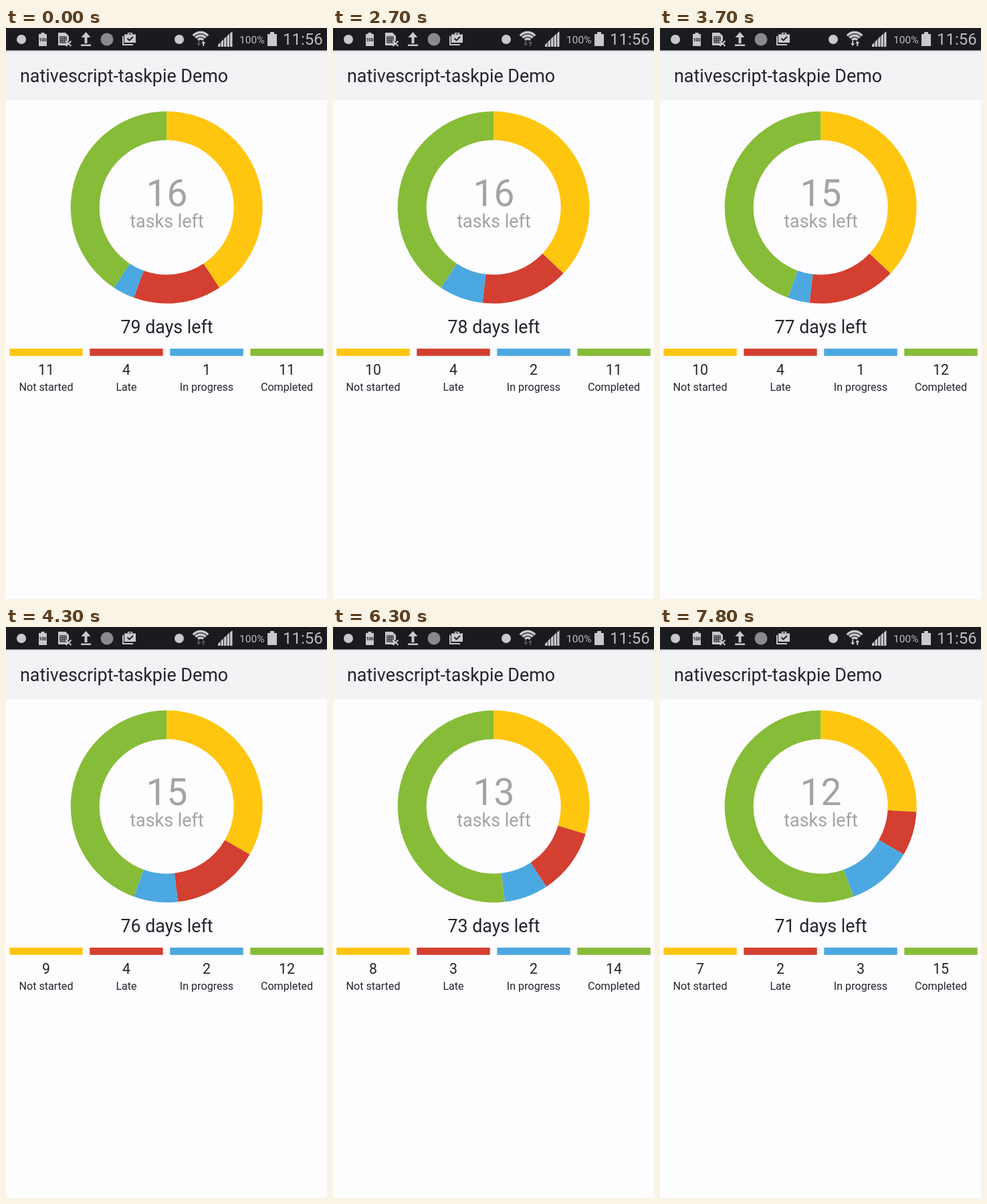
Recreate the animation shown at these times as an HTML page. Size 480x853 px, loop 8000 ms.

```html
<!DOCTYPE html>
<html lang="en">
<head>
<meta charset="utf-8">
<title>Task pie</title>
<style>
  html, body { margin: 0; width: 100%; height: 100%; overflow: hidden; background: #fdfcfe; }
  svg { display: block; width: 100%; height: 100%; }
  text { font-family: Roboto, "Open Sans", sans-serif; fill: #25242a; }
  .mid { text-anchor: middle; }
  .grey { fill: #a3a2a5; }
  .bar text { fill: #bdbdc0; }
</style>
</head>
<body>
<svg viewBox="0 0 480 853">
  <defs>
    <linearGradient id="shade" x2="0" y2="1">
      <stop offset="0" stop-color="#d4d3d7"/>
      <stop offset="1" stop-color="#f3f2f5"/>
    </linearGradient>
  </defs>
  <rect width="480" height="853" fill="#fdfcfe"/>
  <rect y="33" width="480" height="75" fill="#f3f2f5"/>
  <rect y="33" width="480" height="4" fill="url(#shade)"/>
  <text x="21" y="81" font-size="26.9">nativescript-taskpie Demo</text>

  <g class="bar" fill="#c9c9cc">
    <rect width="480" height="33.5" fill="#1b1a1e"/>
    <circle cx="23" cy="17" r="7"/>
    <path d="M49 9h3.5V7h5v2H61v18H49z"/>
    <text class="mid" x="55" y="20" font-size="6.5" font-weight="700" style="fill:#1b1a1e">100</text>
    <path d="M78 7h11l5 5v7l-3 2 2 2-2 3H78z"/>
    <path d="M81 13h9v9h-9zM84 13v9M87 13v9M81 16h9M81 19h9" fill="none" stroke="#1b1a1e" stroke-width="1.2"/>
    <path d="M89.5 19.5l8 7.500m0-7.500l-8 7.500" stroke="#c9c9cc" stroke-width="2"/>
    <path d="M119.5 6l7 8h-5v9h-4v-9h-5zM112 24.500h15V27h-15z"/>
    <circle cx="151" cy="17" r="9.5" fill="#8a898d"/>
    <path d="M174 12h2v12h14v2h-16z"/>
    <path d="M177 9.500h5V7h7v2.500h5V22h-17zM183.500 8.300v1.200h4V8.300z" fill-rule="evenodd"/>
    <path d="M181.500 15.500l3 3 5.500-5.500" fill="none" stroke="#1b1a1e" stroke-width="1.8"/>
    <circle cx="259" cy="17" r="7"/>
    <g fill="none" stroke="#c9c9cc" stroke-width="3.6">
      <path d="M279.900 11.700a14.500 14.500 0 0 1 22.200 0"/>
      <path d="M283.500 14.700a9.800 9.800 0 0 1 15 0"/>
      <path d="M287.200 17.800a5 5 0 0 1 7.600 0"/>
    </g>
    <path id="down" d="M287.200 19h2v4h2l-3 4-3-4h2z"/>
    <path id="up" d="M294.200 27h2v-4h2l-3-4-3 4h2z"/>
    <path d="M317 25l3.500-3.500V28H317zM321.500 20.500l3.500-3.500v11h-3.500zM326 16l3.500-3.500V28H326zM330.500 12l3.500-3.500V28h-3.500zM335 8l3.500-3V28H335z"/>
    <text x="349" y="23" font-size="15.5">100%</text>
    <path d="M391 9h4V6h6v3h4v18h-14z"/>
    <text x="414" y="25" font-size="24">11:56</text>
  </g>

  <g id="ring"></g>
  <text id="tasks" class="mid grey" x="240.5" y="265.5" font-size="55"></text>
  <text class="mid grey" x="240.5" y="297.5" font-size="26.9"
    >tasks left</text>
  <text id="days" class="mid" x="240.5" y="456" font-size="26.8"></text>
  <g id="legend"></g>
</svg>
<script>
const LOOP = 8000, TOTAL = 27;
const CX = 240.2, CY = 268, OUTER = 143.5, INNER = 100.5;
const groups = [
  ["Not started", "#ffc60f"],
  ["Late", "#d33f30"],
  ["In progress", "#4ba8e0"],
  ["Completed", "#87bc38"]
];
// start time, not started, late, in progress; each step uses up one day
const steps = [
  [0, 11, 4, 1],
  [2700, 10, 4, 2],
  [3400, 10, 4, 1],
  [3900, 9, 4, 2],
  [4500, 9, 3, 2],
  [5300, 8, 3, 3],
  [5700, 8, 3, 2],
  [6600, 7, 3, 3],
  [7800, 7, 2, 3]
];
// start time, download lit, upload lit
const traffic = [
  [0, 0, 1], [200, 0, 0], [3200, 1, 1], [4200, 0, 0],
  [5200, 0, 1], [6200, 0, 0], [7200, 1, 1]
];

const $ = id => document.getElementById(id);

function add(parent, tag, attrs, text = "") {
  const el = document.createElementNS("http://www.w3.org/2000/svg", tag);
  for (const key in attrs) el.setAttribute(key, attrs[key]);
  el.textContent = text;
  return parent.appendChild(el);
}

const slices = groups.map(([, fill]) => add($("ring"), "path", { fill }));
const counts = groups.map(([label, fill], i) => {
  const x = 60 + 120 * i, legend = $("legend");
  add(legend, "rect", { x: x - 54.7, y: 479, width: 109.4, height: 10.8, fill });
  add(legend, "text", { class: "mid", x, y: 541.5, "font-size": 16.1 }, label);
  return add(legend, "text", { class: "mid", x, y: 518, "font-size": 21.33 });
});

function point(radius, part) {
  const a = part * 2 * Math.PI;
  return `${CX + radius * Math.sin(a)} ${CY - radius * Math.cos(a)}`;
}

function slice(from, to) {
  const large = to - from > 0.5 ? 1 : 0;
  return `M${point(OUTER, from)}A${OUTER} ${OUTER} 0 ${large} 1 ${point(OUTER, to)}` +
    `L${point(INNER, to)}A${INNER} ${INNER} 0 ${large} 0 ${point(INNER, from)}Z`;
}

const indexAt = (list, t) => list.findLastIndex(row => row[0] <= t);

function draw(t) {
  const n = indexAt(steps, t);
  const open = steps[n].slice(1);
  const left = open.reduce((a, b) => a + b);
  let sum = 0;
  [...open, TOTAL - left].forEach((value, i) => {
    slices[i].setAttribute("d", slice(sum / TOTAL, (sum + value) / TOTAL));
    counts[i].textContent = value;
    sum += value;
  });
  $("tasks").textContent = left;
  $("days").textContent = `${79 - n} days left`;

  const [, down, up] = traffic[indexAt(traffic, t)];
  $("down").setAttribute("fill", down ? "#c9c9cc" : "#55545a");
  $("up").setAttribute("fill", up ? "#c9c9cc" : "#55545a");
}

const start = performance.now();
function tick() {
  draw((performance.now() - start) % LOOP);
  requestAnimationFrame(tick);
}
tick();
</script>
</body>
</html>
```
